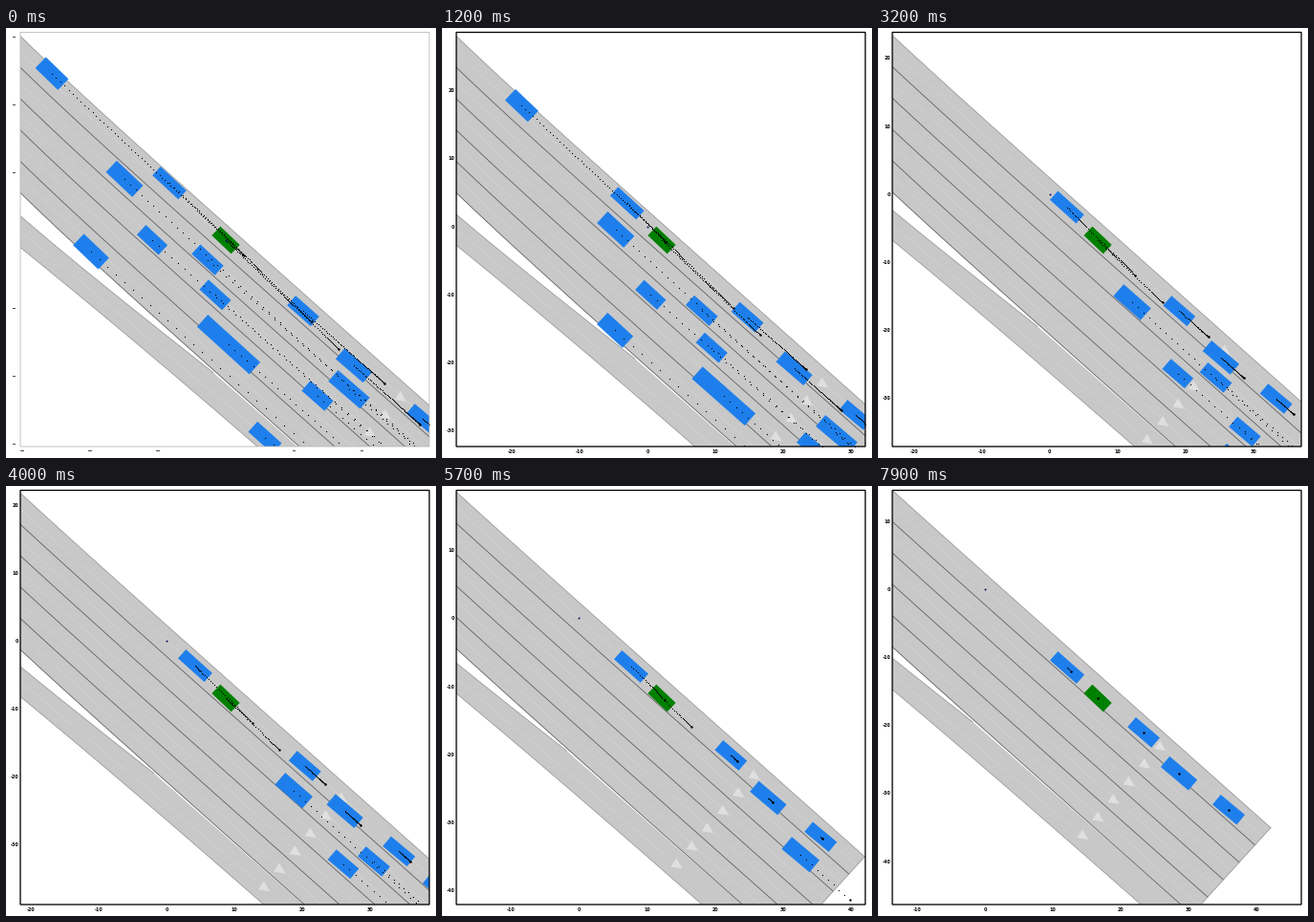
A matplotlib script for the animation above (8 s loop, 450 by 450 pixels).

```python
import numpy as np
import matplotlib.pyplot as plt
from matplotlib.animation import FuncAnimation
from matplotlib.patches import Polygon, Rectangle

SIZE, DPI, FRAMES = 450, 100, 80
PT = 72 / DPI
TICK = 71.1
EGO = np.array([230.0, 222.0])
X0, Y0, X1, Y1 = 15, 4.5, 443, 438
ROAD, EDGE, LANE, MID, ARROW = "#c8c8c8", "#999999", "#5c5c5c", "#d2d2d2", "#dfdfdf"
BLUE, GREEN, ORIGIN = "#1e7fec", "#008000", "#10106a"
ROAD_END = 286
T = np.arange(FRAMES + 3) / 10


def edge(x):
    """Upper road border, slightly steeper at the far left."""
    return 0.889 * x - 16.3 - 6 * np.exp(-(x + 214) / 70)


def smooth(t, keys, values):
    """Cubic curve through the key values."""
    keys, values = np.array(keys), np.array(values)
    slope = np.gradient(values, keys)
    i = np.clip(np.searchsorted(keys, t, side="right") - 1, 0, len(keys) - 2)
    h = keys[i + 1] - keys[i]
    u = (t - keys[i]) / h
    a, b = slope[i] * h, slope[i + 1] * h
    return (values[i] * (1 + 2 * u) * (1 - u) ** 2 + a * u * (1 - u) ** 2
            + values[i + 1] * u * u * (3 - 2 * u) - b * u * u * (1 - u))


def cruise(x, speed, slowing=0):
    return x + speed * T - slowing * T ** 2


def brake(x, stop, seconds, hold=0):
    u = np.minimum(T / seconds, 1)
    return stop + (x - stop) * (1 - u) ** 2 * (1 + hold * u)


def car(length, width, lane, x, drift=0, seen=FRAMES):
    y = edge(x) + 18.5 + 34.3 * (lane + drift * T)
    path = np.column_stack([x, y])[x < ROAD_END]
    return length, width, path, min(seen, len(path))


ego_x = smooth(T, [0, 1.2, 2.4, 4, 4.8, 6.5, 7.9], [0, 15, 36, 62, 69, 103, 118])
ego_path = np.column_stack([ego_x, 0.965 * ego_x])

cars = [
    car(33, 16, -0.32, cruise(-182, 45, 2.5), 0.03, seen=20),
    car(37, 12.5, -0.26, ego_x - 32 - 27 * np.exp(-T / 0.65), 0.045),
    car(33, 13.5, 0, brake(81, 166, 8)),
    car(38, 14.5, 0.29, brake(134, 203, 7.8)),
    car(33, 13.5, 0.05, brake(206, 255, 6.8, 0.7)),
    car(33, 13.5, 0.1, brake(285, 285, 1), seen=55),
    car(38, 16.5, 0.85, cruise(-106, 61, 0.3), 0.05),
    car(33, 13.5, 1.04, cruise(-19, 65, 1.5)),
    car(44, 15.5, 1.15, cruise(129, 57.5)),
    car(31, 14, 1.95, cruise(-77, 67.5, 0.5)),
    car(32, 14, 1.9, cruise(-11, 64, -1)),
    car(32, 14, 2.2, cruise(96, 64)),
    car(74, 17, 3.05, cruise(3, 64)),
    car(36.5, 16.5, 4.0, cruise(-141, 86, -2.7)),
    car(34, 14.5, 4.9, cruise(41, 87)),
]


def border(offset, end):
    x = np.linspace(-240, end, 40)
    return np.column_stack([x, edge(x) + (offset(x) if callable(offset) else offset)])


GAP = 32.8
lanes = [border(GAP * i, 299 - 16.5 * i) for i in range(6)]
middles = [border(GAP * (i + 0.5), 291 - 16.5 * i) for i in range(5)]
ramp = border(lambda x: 188 - 0.105 * (x + 214), -13)
side = border(lambda x: 200 + 21 * np.exp(-(x + 214) / 130), 200)
marks = [(183 - 16.2 * i, 164 + 18.6 * i) for i in range(6)]
TRIANGLE = np.array([(0, -6), (-6, 3), (6, 5)])

fig = plt.figure(figsize=(SIZE / DPI, SIZE / DPI), dpi=DPI, facecolor="white")
ax = fig.add_axes([0, 0, 1, 1])


def shape(pts, color, z):
    p = ax.add_patch(Polygon(pts, closed=True, fc=color, ec="none", zorder=z))
    p.set_clip_path(clip)


def rect(center, length, width, angle, color, z):
    a = np.radians(angle)
    u = np.array([np.cos(a), np.sin(a)]) * length / 2
    v = np.array([-np.sin(a), np.cos(a)]) * width / 2
    shape([center + u + v, center + u - v, center - u - v, center - u + v], color, z)


def stroke(pts, color, width=0.8):
    ln, = ax.plot(*np.transpose(pts), color=color, lw=width * PT, zorder=2)
    ln.set_clip_path(clip)


def dots(pts, size, color="black", marker="s"):
    ln, = ax.plot(*np.transpose(pts), marker, color=color, ms=size * PT, mew=0, zorder=6)
    ln.set_clip_path(clip)


def trail(pts):
    dots(pts, 1.1)
    dots(pts[-1:], 2.4, marker="o")


def draw_road(o):
    top, low = lanes[0], lanes[-1]
    shape(np.vstack([top, low[::-1]]) + o, ROAD, 1)
    shape(np.vstack([ramp, low[-1:], side[::-1]]) + o, ROAD, 1)
    for m in middles:
        stroke(m + o, MID)
    stroke((ramp + side[:len(ramp)]) / 2 + o, MID)
    for b in lanes[1:]:
        stroke(b + o, LANE)
    for b in (top, ramp, side, [top[-1], low[-1]]):
        stroke(b + o, EDGE)
    for m in marks:
        shape(TRIANGLE + m + o, ARROW, 3)


def draw_axes(o, faint):
    ax.add_patch(Rectangle((X0, Y0), X1 - X0, Y1 - Y0, fill=False, zorder=8, snap=False,
                           ec="#b4b4b4" if faint else "black", lw=(0.8 if faint else 1.3) * PT))
    font = dict(size=4.8 * PT, weight="bold", va="center_baseline", zorder=9)
    for n in range(-5, 6):
        x, y = o[0] + n * TICK, o[1] - n * TICK
        in_x, in_y = X0 - 1 <= x <= X1, Y0 <= y <= Y1
        if faint:
            if in_x and n:
                ax.plot([x - 1.5, x + 1], [442, 442], color="#333333", lw=0.9 * PT)
            if in_y and n:
                ax.plot([6.5, 9], [y, y], color="#333333", lw=0.9 * PT)
            continue
        if in_x:
            ax.text(x, 442.6, f"{n * 10}", ha="center", **font)
        if in_y:
            ax.text(13, y, f"{n * 10}", ha="right", **font)


def update(k):
    global clip
    ax.clear()
    ax.set_xlim(0, SIZE)
    ax.set_ylim(SIZE, 0)
    ax.axis("off")
    clip = Rectangle((X0, Y0), X1 - X0, Y1 - Y0, transform=ax.transData)
    o = EGO - ego_path[k]
    draw_road(o)
    for length, width, path, seen in cars:
        if k < seen:
            rect(path[k] + o, length, width, 42.3 - 0.01 * path[k][0], BLUE, 4)
            trail(path[k:] + o)
    rect(EGO, 28, 13, 43.5, GREEN, 5)
    trail(ego_path[k:FRAMES] + o)
    dots([o], 2, ORIGIN, "o")
    draw_axes(o, k == 0)
    return []


anim = FuncAnimation(fig, update, frames=FRAMES, interval=100, repeat=True, repeat_delay=0)
plt.show()
```
